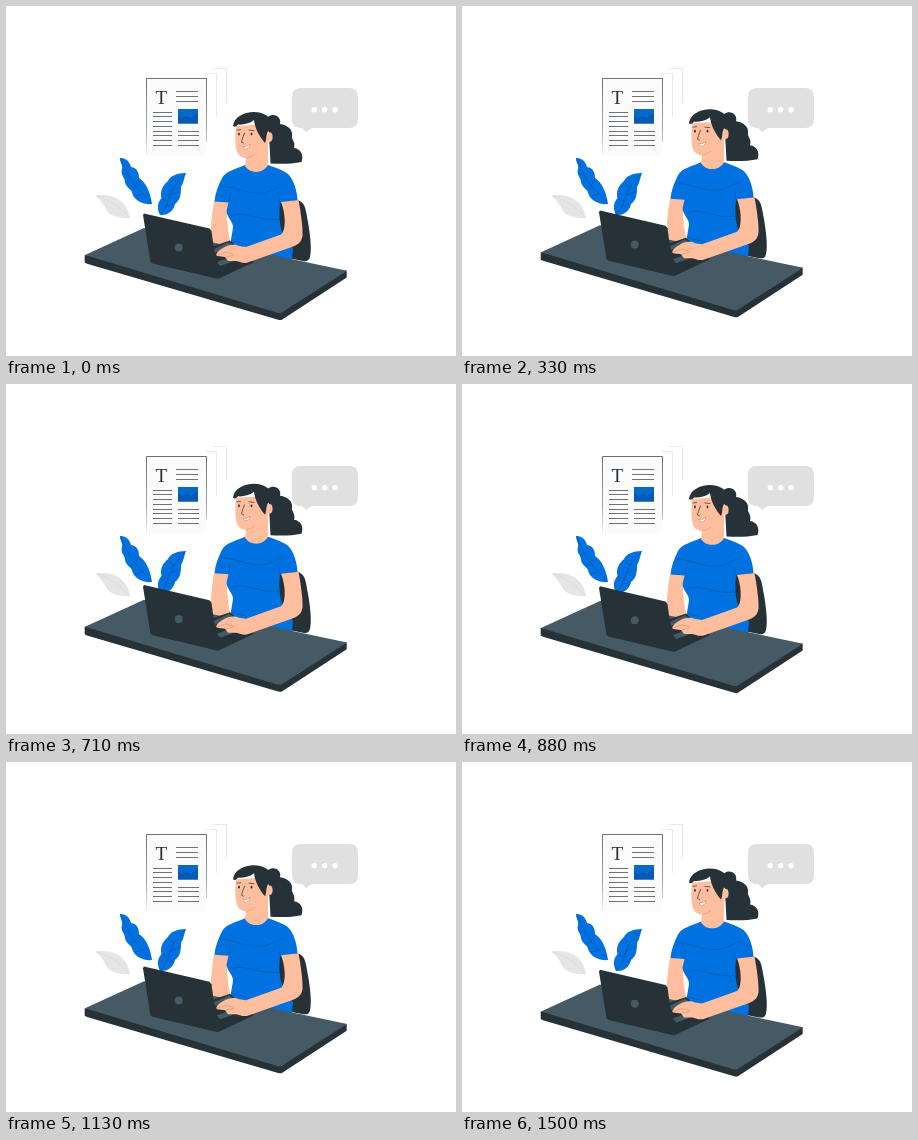
Write an HTML page that moves like this. It is 450x350 px and loops after 1540 ms.

```html
<!DOCTYPE html>
<html lang="en">
<head>
<meta charset="utf-8">
<title>Working at a laptop</title>
<style>
  html, body { margin: 0; width: 100%; height: 100%; overflow: hidden; background: #fff; }
  svg { display: block; width: 450px; height: 350px; }
  .dark { fill: #263238; }
  .slate { fill: #455a64; }
  .blue { fill: #0071e0; }
  .skin { fill: #ffbe9d; }
  .line { fill: none; stroke: #263238; stroke-width: .7; stroke-linecap: round; }
  .fold { fill: none; stroke: #0757ae; stroke-width: .7; stroke-linecap: round; }
</style>
</head>
<body>
<svg viewBox="0 0 450 350">
  <defs>
    <linearGradient id="edge" x2="0" y2="1">
      <stop stop-color="#67717e"/>
      <stop offset=".65" stop-color="#a2a8b0"/>
      <stop offset="1" stop-color="#f2f2f2"/>
    </linearGradient>
  </defs>

  <!-- document -->
  <path d="M206 62.5H220.5V97M199 67.5H210.5V111" fill="none" stroke="#e9eaec"/>
  <rect x="140.5" y="72.5" width="60" height="77" rx="1" fill="#fbfbfc"/>
  <path d="M140.5 149V72.5H200.5V136" fill="none" stroke="url(#edge)"/>
  <text x="155.3" y="97.5" font-family="'Liberation Serif', serif" font-size="19" text-anchor="middle" fill="#263238">T</text>
  <g id="rules" stroke="#6d7378" shape-rendering="crispEdges"/>
  <rect x="172" y="103" width="20" height="14.5" fill="#0768cc"/>
  <path d="M172 109L176 112 181 110 185 112 192 107V117.5H172Z" fill="#0759b3"/>

  <!-- speech bubble -->
  <path d="M295 82H343Q352 82 352 91V113Q352 122 343 122H306L300 126 296 122H295Q286 122 286 113V91Q286 82 295 82Z" fill="#e0e0e0"/>
  <g fill="#fff">
    <circle cx="308.3" cy="103.8" r="2.7"/>
    <circle cx="318.7" cy="103.8" r="2.7"/>
    <circle cx="329.1" cy="103.8" r="2.7"/>
  </g>

  <!-- leaves -->
  <path d="M89 189.5C100 188 111 190 117 197 121 201 123 206 124 212 115 213 104 210 101 205 98 200 96 195 89 189.5Z" fill="#e5e5e5"/>
  <path d="M91 190Q109 195 123 211" fill="none" stroke="#d3d3d3" stroke-width=".6"/>
  <path class="blue" d="M114 152C119 152 123 154 125 161 131 162 133 166 133 172 139 176 144 184 146 198 138 199 129 195 126.500 188 126 183 120 182 119 176 119 171 114 169 116 163 117 159 114 157 114 152Z"/>
  <path class="fold" d="M115 154Q120 163 123 170T145 197M123 170L119 168M129 180L125 181M129 180L132 174M136 188L130 190"/>
  <path class="blue" d="M180 167C171 167 164 170 162 175 156 180 154 186 155.500 192 151 197 151 203 154 209 162 210 168 204 169 198 175 194 175 186 175 181 178 176 178 172 180 167Z"/>
  <path class="fold" d="M179 168Q166 181 163 192T155 208M168 181L164 179M164 189L173 186M162 195L157 193M160 200L167 199"/>

  <g id="scene">
    <!-- chair -->
    <path class="dark" d="M272 196L284 194Q289 192 294 195C300 198 300 207 302 216 304 228 306 243 304 251Q303 256 297 255L272 250Z"/>

    <!-- torso and neck -->
    <path class="skin" d="M208 195H223L221 207C221 217 222 228 225 238L216 243 204 240C204 225 206 208 208 195Z"/>
    <path class="blue" d="M239 159C230 163 220 165 216 172 212 180 209 188 208.500 195.500L222.500 196.500 220.500 205C221 212 227 215 227 221 226 230 224 234 224.500 246L286 254 287 243 276 226C273 216 273 206 274 196.500L291.500 194C291 185 288 174 282 168 277 164 268 161 262 159Z"/>
    <path class="skin" d="M230 120C229 130 229 139 231 146 233 150 236 152 240 152L239 160C244 168 257 168 262 159V118Z"/>
    <path class="fold" d="M216 180C229 181 237 186 249 187S268 183 277 179M226 209C242 205 254 216 273 213M227 235L240 238M223 195L224 188M274 197L273 190"/>

    <!-- head -->
    <path class="dark" d="M262 111C268 106 276 111 274 118 282 119 287 124 286 130 285 133 290 136 288 142 295 143 298 149 295.500 156 286 158 275 158 264.500 157.500Z"/>
    <path class="dark" d="M227 120C228 111 238 106 248 106 257 106 264 110 267 117L266 127 262 125C260 128 261 133 259 137 254 131 249 123 248 114 243 118 236 119 232 118.500Q229 122 227 120Z"/>
    <ellipse class="skin" cx="263.600" cy="131" rx="3" ry="4.800"/>
    <path class="line" d="M238.500 127Q236 133 235.500 136L237.500 137M231 124L234.500 123.500M243 124L248 124.500"/>
    <ellipse class="dark" cx="233" cy="128" rx=".9" ry="1.400"/>
    <ellipse class="dark" cx="245.500" cy="128" rx=".9" ry="1.400"/>
    <path d="M237 140.500Q241 141 244 138.500 243 143 239 143Z" fill="#fff" stroke="#9d5d49" stroke-width=".4"/>
    <path d="M240 152Q246 151 249 148" fill="none" stroke="#eb996f" stroke-width=".7"/>

    <!-- desk -->
    <path class="dark" d="M78.700 249V256.500L81 257.700 273 314H275.500L340.700 271.500V264.700Z"/>
    <path class="slate" d="M79 249L138 222 341 264.700 275 307H272Z"/>

    <!-- laptop -->
    <path class="dark" d="M205 241L224 234.500 248 256 212 273Z"/>
    <path class="slate" d="M208 243L223 236 227 239 209 247ZM211 256L222 252 227 255.500 214 260Z"/>
    <path class="dark" d="M138 207.300L203.500 222.500 205.500 225 212 273 146.500 257.500 144.500 256 137 209Z"/>
    <circle class="slate" cx="172.700" cy="241.300" r="4"/>

    <!-- near arm -->
    <path class="skin" d="M275 196L292.500 194C295 207 297 222 296.500 230 295 239 288 240 280 243L243 256C238 258 235 256 230 255L222 255 219 251 211 250C209 248 212 245 217 242 223 238 229 238 233 240L240 241 275 228.500C280 225 280 208 275 196Z"/>
    <path d="M211 249L220 246 228 248M220 251L228 249" fill="none" stroke="#e58f68" stroke-width=".6"/>
  </g>
</svg>
<script>
  const PERIOD = 1540, LEAD = 40, LIFT = 6.8, REST = 0.45;
  const scene = document.getElementById('scene');

  const rules = (x1, x2, y, count) => Array.from({ length: count }, (_, i) =>
    `<path d="M${x1} ${y + i * 4.75}H${x2}"/>`).join('');
  document.getElementById('rules').innerHTML =
    rules(170, 192, 85.7, 3) + rules(147, 166, 106, 8) + rules(172, 193, 125, 4);

  // The scene floats up and down at constant speed.
  function draw(now) {
    const phase = (now + LEAD) / PERIOD % 1;
    const height = LIFT * (1 - Math.abs(1 - 2 * phase));
    scene.setAttribute('transform', `translate(0 ${(REST - height).toFixed(2)})`);
    requestAnimationFrame(() => draw(performance.now() - start));
  }
  const start = performance.now();
  draw(0);
</script>
</body>
</html>
```
